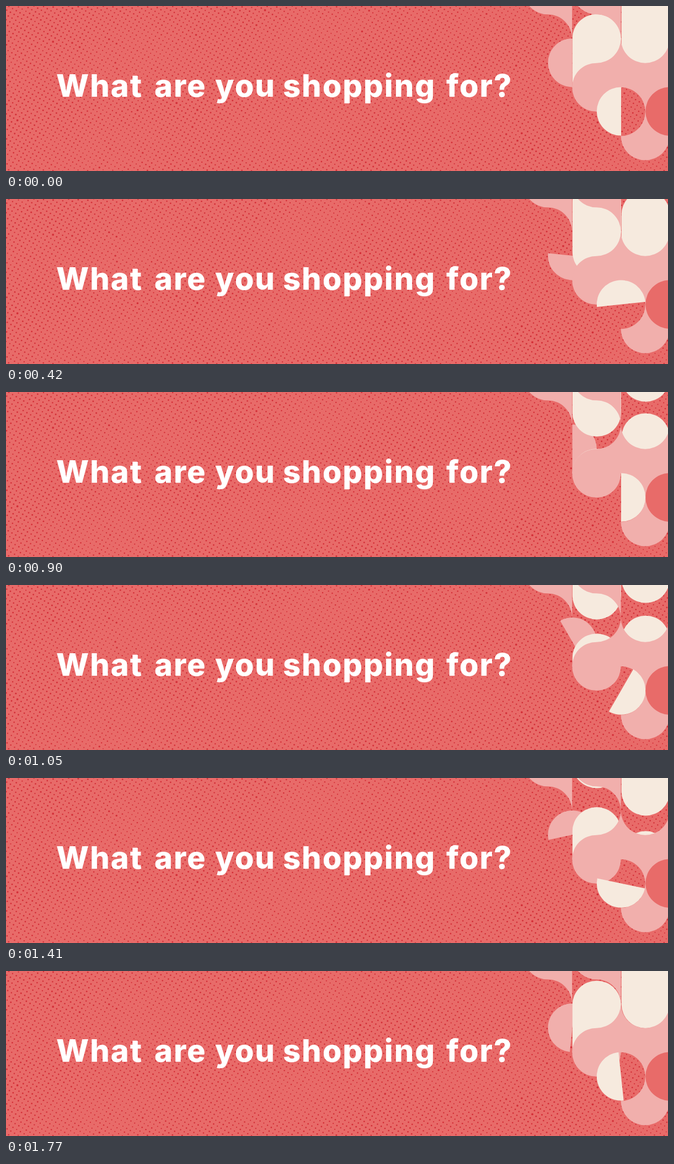
These frames come from a looping animation (1200x300 px, 1.8 s). An HTML page with a canvas:

```html
<!DOCTYPE html>
<html lang="en">
<head>
<meta charset="utf-8">
<title>What are you shopping for?</title>
<style>
  html, body { margin: 0; width: 100%; height: 100%; overflow: hidden; background: #e86b69; }
  canvas, svg { position: absolute; left: 0; top: 0; width: 1200px; height: 300px; display: block; }
  .pink { fill: #f1afac; }
  .cream { fill: #f6eade; }
  .red { fill: #e86b69; }
  text { font: 800 56px Inter, "Open Sans", sans-serif; letter-spacing: 2px; fill: #fff; }
</style>
</head>
<body>
<canvas id="dots" width="1200" height="300"></canvas>
<svg viewBox="0 0 1200 300">
  <clipPath id="columns"><rect x="-2" y="-8" width="5" height="10"/></clipPath>
  <!-- one unit is the radius of every arc -->
  <g transform="translate(1115 59) scale(44.2)">
    <path id="pinkHalf" class="pink" d="M0-1A1 1 0 0 0 0 1Z"/>
    <g class="cream" clip-path="url(#columns)">
      <rect id="leftOut" x="-2" width="2" rx="1"/>
      <rect id="leftIn" x="-2" width="2" rx="1"/>
      <rect id="rightOut" x=".015" width="1.985" rx="1"/>
      <rect id="rightIn" x=".015" width="1.985" rx="1"/>
    </g>
    <g class="pink" transform="translate(-.01 .01)">
      <path d="M-4-2A1 1 0 0 0-3-1A1 1 0 0 1-2 0V-2Z"/>
      <path d="M-2-2A1 1 0 0 0-1-1A1 1 0 0 1 0 0V-2Z"/>
      <path d="M-2 2A1 1 0 0 1-1 1A1 1 0 0 0 0 0A1 1 0 0 0 2 0V4A1 1 0 0 1 0 4A1 1 0 0 0 0 2A1 1 0 0 1-2 2Z"/>
    </g>
    <circle class="red" cx="2" cy="3" r="1"/>
    <path id="creamHalf" class="cream" d="M0-1A1 1 0 0 0 0 1Z"/>
  </g>
  <text y="165"><tspan x="91">What</tspan> <tspan x="269">are</tspan> <tspan x="379">you</tspan> <tspan x="502">shopping</tspan> <tspan x="798">for?</tspan></text>
</svg>
<script>
const LOOP = 1800, STEP = 30;
const el = id => document.getElementById(id);

function drawDots() {
  const ctx = el('dots').getContext('2d');
  const gap = 7.8, angle = Math.PI / 6;
  const c = Math.cos(angle) * gap, s = Math.sin(angle) * gap;
  let seed = 11;
  const rand = () => (seed = seed * 16807 % 2147483647) / 2147483647;
  ctx.fillStyle = '#d32f38';
  for (let i = -20; i < 160; i++) {
    for (let j = -95; j < 40; j++) {
      const x = 28 + i * c - j * s, y = 86 + i * s + j * c;
      const n = rand();
      if (x < -3 || x > 1203 || y < -3 || y > 303) continue;
      const wave = Math.sin(x / 83 + y / 47) * Math.cos(x / 141 - y / 61);
      const r = 1.2 + 0.15 * wave + 0.35 * (n - 0.5) + (n > 0.99 ? 0.4 : 0);
      ctx.beginPath();
      ctx.arc(x, y, r, 0, 2 * Math.PI);
      ctx.fill();
    }
  }
}

// top and bottom are the centres of the round ends
function pill(id, top, bottom) {
  const node = el(id);
  node.setAttribute('visibility', top < bottom ? 'visible' : 'hidden');
  node.setAttribute('y', top - 1);
  node.setAttribute('height', Math.max(0, bottom - top) + 2);
}

function draw(now) {
  const p = Math.floor(now % LOOP / STEP) * STEP / LOOP;
  el('pinkHalf').setAttribute('transform', `translate(-2 1) rotate(${-360 * p})`);
  el('creamHalf').setAttribute('transform', `translate(0 3) rotate(${360 * p})`);
  pill('leftOut', -5 * p, 2 - 5 * p);
  pill('leftIn', 4 - 4 * p, 4);
  pill('rightOut', 4.62 * p - 1.77, 4);
  pill('rightIn', -7, 4.05 * p - 3.96);
  requestAnimationFrame(draw);
}

drawDots();
draw(0);
</script>
</body>
</html>
```
